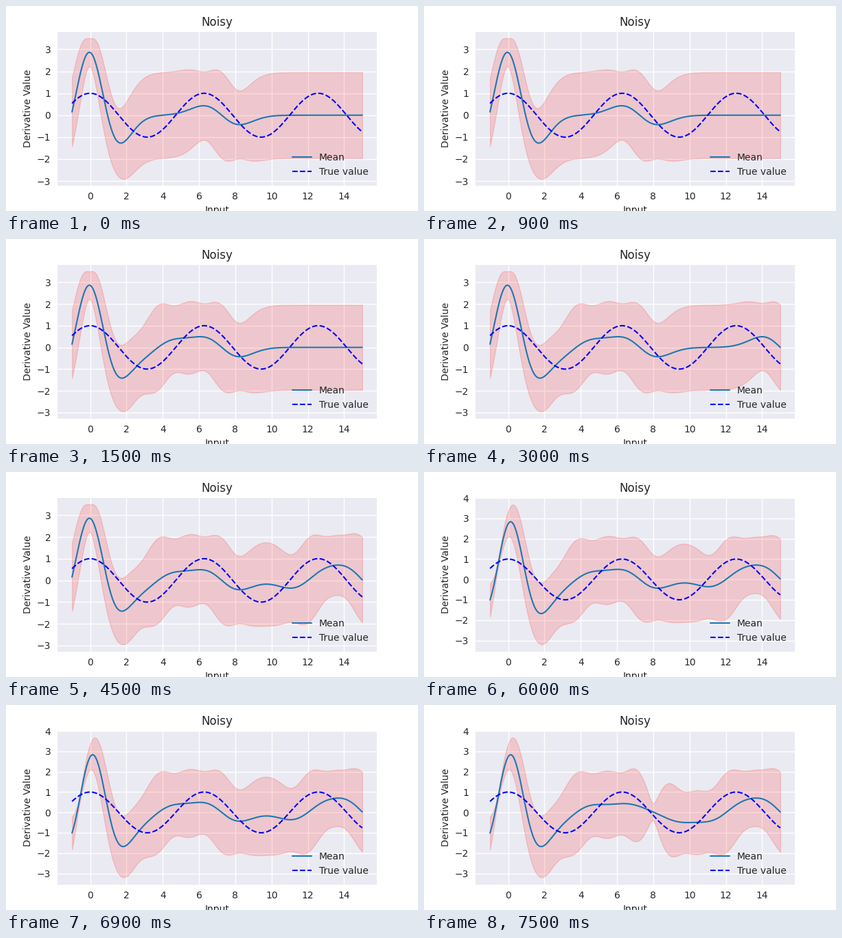
A matplotlib script for the animation above (8000 ms loop, 600 by 300 pixels).

```python
import matplotlib.pyplot as plt
import numpy as np
from matplotlib.animation import FuncAnimation
from matplotlib.ticker import MultipleLocator

DPI = 100
STEP_MS = 500
TICKS_PER_STAGE = 3
FRAMES = 16

# Observations of the function, in the order they arrive
OBS_X = np.array([-0.110, 0.020, 7.25, 3.70, 15.0, 12.05, -1.0, 8.70])
OBS_Y = np.array([-0.228, 0.188, 0.71, -0.515, 0.81, -0.58, -0.86, 0.745])
FIRST = 3
NOISE = 0.001

Y_LIMITS = [(-3.20, 3.81)] + [(-3.272, 3.814)] * 3 + [(-3.535, 4.018)] * 2

plt.rcParams.update({
    "font.family": "DejaVu Sans",
    "font.size": 10,
    "text.color": "0.15",
    "axes.labelcolor": "0.15",
    "axes.facecolor": "#EAEAF2",
    "axes.edgecolor": "white",
    "axes.linewidth": 0,
    "axes.axisbelow": True,
    "axes.grid": True,
    "grid.color": "white",
    "grid.linewidth": 1,
    "lines.solid_capstyle": "round",
    "lines.linewidth": 1.5,
    "legend.frameon": False,
})
for side in ("xtick", "ytick"):
    plt.rcParams.update({
        f"{side}.color": "0.15",
        f"{side}.major.size": 0,
        f"{side}.major.pad": 7,
    })

grid = np.linspace(-1, 15, 400)


def rbf(a, b):
    return np.exp(-0.5 * (a[:, None] - b[None, :]) ** 2)


def derivative_posterior(count):
    """Mean and deviation of the derivative given the first observations."""
    x, y = OBS_X[:count], OBS_Y[:count]
    cov = rbf(x, x) + NOISE * np.eye(count)
    cross = (x[None, :] - grid[:, None]) * rbf(grid, x)
    mean = cross @ np.linalg.solve(cov, y)
    var = 1 - np.sum(cross * np.linalg.solve(cov, cross.T).T, axis=1)
    return mean, np.sqrt(np.maximum(var, 0))


fig = plt.figure(figsize=(6, 3), dpi=DPI, facecolor="white")
ax = fig.add_axes([0.125, 0.125, 0.775, 0.75])


def draw(i):
    stage = i // TICKS_PER_STAGE
    mean, dev = derivative_posterior(FIRST + stage)
    ax.clear()
    ax.fill_between(grid, mean - 1.96 * dev, mean + 1.96 * dev,
                    color="red", alpha=0.15, linewidth=1)
    ax.plot(grid, mean, color="#1f77b4", label="Mean")
    ax.plot(grid, np.cos(grid), "--", color="blue", label="True value")
    ax.set_xlim(-1.8, 15.8)
    ax.set_ylim(*Y_LIMITS[stage])
    ax.set_xticks(range(0, 15, 2))
    ax.yaxis.set_major_locator(MultipleLocator(1))
    ax.set_title("Noisy")
    ax.set_xlabel("Input")
    ax.set_ylabel("Derivative Value")
    ax.legend(loc="lower right")
    return []


anim = FuncAnimation(fig, draw, frames=FRAMES, interval=STEP_MS,
                     init_func=lambda: draw(0), repeat=True, repeat_delay=0)
plt.show()
```
